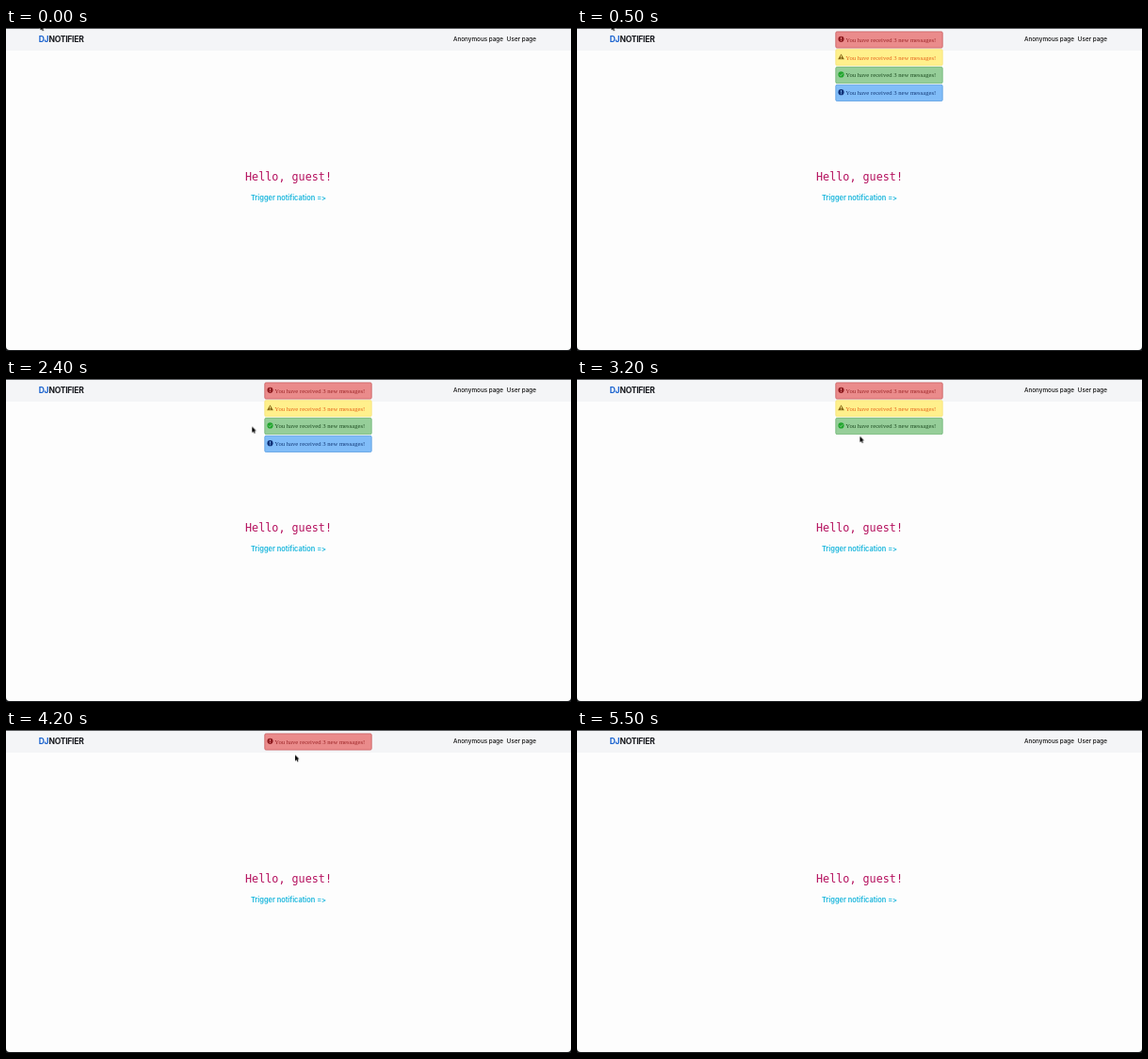
Animation, 600 px wide and 343 px high, one loop 5600 ms. Source, as an HTML page:

```html
<!DOCTYPE html>
<html lang="en">
<head>
<meta charset="utf-8">
<title>DJNOTIFIER</title>
<style>
  html, body { margin: 0; width: 100%; height: 100%; overflow: hidden; background: #000; }
  svg { display: block; width: 100%; height: 100%; }

  .ui { font-family: Inter, sans-serif; font-variant-ligatures: none; }
  .logo { font-size: 8.5px; font-weight: 700; letter-spacing: -.025em; fill: #16181d; }
  .logo tspan { fill: #1660cf; }
  .nav { font-size: 6.33px; font-weight: 500; fill: #111; }
  .hello { font: 11.75px "DejaVu Sans Mono", monospace; fill: #b5125f; }
  .trigger { font-size: 7.4px; font-weight: 600; fill: #16b5dc; }

  .alert { font: 6.67px "Liberation Serif", serif; animation: 5.6s step-end infinite; }
  .panel { fill: var(--bg); stroke: var(--line); stroke-width: .8px; }
  .label { fill: var(--ink); }
  .icon { fill: var(--icon); }
  .mark { fill: none; stroke: var(--bg); stroke-width: .9px; }
  .error   { --bg: #ea8b8b; --line: #c95c5e; --ink: #9c2527; --icon: #8f1c20; animation-name: error; }
  .warning { --bg: #fff08c; --line: #f7e57d; --ink: #e5631c; --icon: #8a6a18; animation-name: warning; }
  .success { --bg: #96ce99; --line: #70b675; --ink: #1c4b20; --icon: #20a52c; animation-name: success; }
  .info    { --bg: #81bdf8; --line: #5c9fe2; --ink: #143a78; --icon: #12347a; animation-name: info; }

  /* All alerts open at 300 ms and are dismissed from the bottom up. */
  @keyframes error   { 0% { opacity: 0 } 5.357% { opacity: 1 } 82.142%, 100% { opacity: 0 } }
  @keyframes warning { 0% { opacity: 0 } 5.357% { opacity: 1 } 69.642%, 100% { opacity: 0 } }
  @keyframes success { 0% { opacity: 0 } 5.357% { opacity: 1 } 64.285%, 100% { opacity: 0 } }
  @keyframes info    { 0% { opacity: 0 } 5.357% { opacity: 1 } 55.357%, 100% { opacity: 0 } }

  .pointer { animation: travel 5.6s ease-in-out infinite, leave 5.6s step-end infinite; }
  @keyframes travel {
    0%, 10.714%       { transform: translate(36.5px, -4px); }
    21.428%, 32.142%  { transform: translate(167px, 61px); }
    42.857%           { transform: translate(261.3px, 50.5px); }
    53.571%, 57.142%  { transform: translate(300.4px, 60.8px); }
    62.5%, 64.285%    { transform: translate(302px, 47px); }
    69.642%           { transform: translate(305px, 30px); }
    75%               { transform: translate(307px, 26.5px); }
    80.357%, 100%     { transform: translate(309px, 12px); }
  }
  @keyframes leave { 0% { opacity: 1 } 83.928%, 100% { opacity: 0 } }
</style>
</head>
<body>
<svg viewBox="0 0 600 343">
  <rect width="600" height="343" fill="#17191b"/>
  <path d="M0 0H600V338Q600 342 596 342H4Q0 342 0 338Z" fill="#fdfdfd"/>
  <rect width="600" height="24" fill="#f4f5f7"/>
  <rect width="600" height="1" fill="#5c5e61"/>

  <g class="ui">
    <text class="logo" x="34.7" y="15.3"><tspan>DJ</tspan>NOTIFIER</text>
    <text class="nav" x="528" y="14.3" text-anchor="end">Anonymous page</text>
    <text class="nav" x="563" y="14.3" text-anchor="end">User page</text>
    <text class="trigger" x="300" y="182.8" text-anchor="middle">Trigger notification =&gt;</text>
  </g>
  <text class="hello" x="300" y="161.8" text-anchor="middle">Hello, guest!</text>

  <defs>
    <g id="message">
      <rect class="panel" x="274.8" y="3.9" width="113.4" height="17.2" rx="1.3"/>
      <text class="label" x="285.3" y="14.8">You have received 3 new messages!</text>
    </g>
    <g id="notice">
      <circle class="icon" cx="280.5" cy="11.8" r="3.1"/>
      <path class="mark" d="M280.5 9.8v2.4M280.5 12.9v.9"/>
    </g>
  </defs>

  <g class="alert error">
    <use href="#message"/><use href="#notice"/>
  </g>
  <g class="alert warning" transform="translate(0 18.8)">
    <use href="#message"/>
    <path class="icon" d="M280.5 8.7L283.9 14.4H277.1Z"/>
    <path class="mark" d="M280.5 10.5v1.8M280.5 12.9v.8"/>
  </g>
  <g class="alert success" transform="translate(0 37.6)">
    <use href="#message"/>
    <circle class="icon" cx="280.5" cy="11.8" r="3.1"/>
    <path class="mark" d="M278.9 11.9l1.2 1.2 2.1-2.4"/>
  </g>
  <g class="alert info" transform="translate(0 56.4)">
    <use href="#message"/><use href="#notice"/>
  </g>

  <path class="pointer" d="M0 0V6.4L1.5 5 2.5 7.3 3.5 6.9 2.5 4.6H4.5Z"
        fill="#000" stroke="#fff" stroke-width=".6" paint-order="stroke"/>
</svg>
</body>
</html>
```
